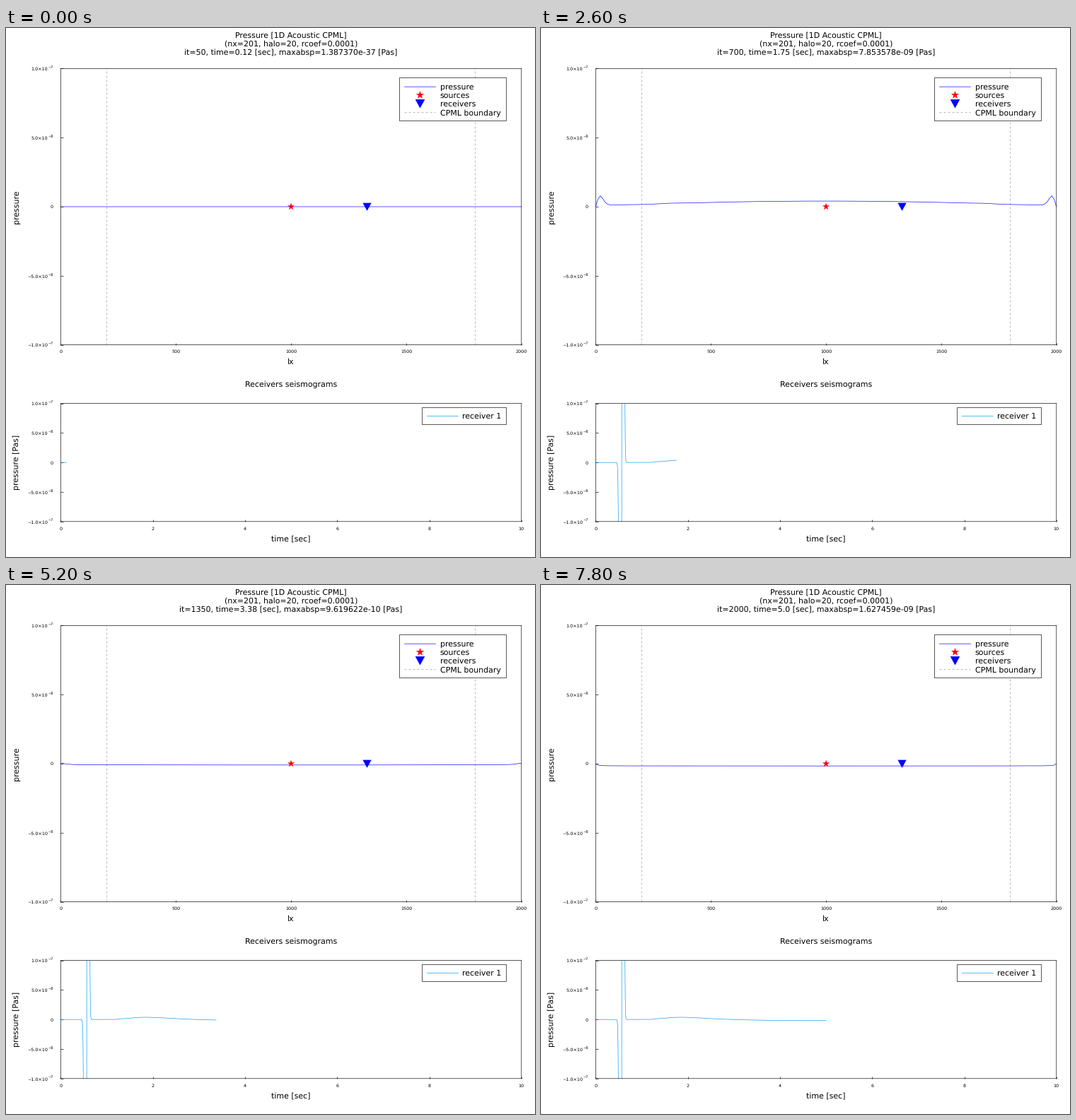
Write a matplotlib script that moves like this. It is 748 by 749 pixels and loops after 8000 ms.

```python
import numpy as np
import matplotlib.pyplot as plt
from matplotlib.animation import FuncAnimation
from matplotlib.patches import Polygon, Rectangle

W, H, DPI = 748, 749, 64
PT = 72 / DPI                     # points per pixel

# Model: 1D acoustic medium with CPML layers at both ends
NX, HALO, RCOEF = 201, 20, 0.0001
DX, DT, VEL = 10.0, 0.0025, 2000.0
FREQ, T0 = 10.0, 0.4
SRC, REC = 100, 133
FRAMES, STEPS = 40, 50
NT = FRAMES * STEPS


def ricker(t):
    b = (np.pi * FREQ * (t - T0)) ** 2
    return (1 - 2 * b) * np.exp(-b)


def cpml(pos):
    """Recursive convolution coefficients at the given node positions."""
    depth = np.maximum(HALO - pos, pos - (NX - 1 - HALO)).clip(0) / HALO
    d = -3 * VEL * np.log(RCOEF) / (2 * HALO * DX) * depth ** 2
    alpha = np.pi * FREQ * (1 - depth)
    b = np.exp(-(d + alpha) * DT)
    return d * (b - 1) / (d + alpha), b


def simulate():
    a, b = cpml(np.arange(1, NX - 1))
    a_half, b_half = cpml(np.arange(NX - 1) + 0.5)
    psi, xi = np.zeros(NX - 1), np.zeros(NX - 2)
    p = np.zeros((NT + 1, NX))
    for n in range(NT):
        cur, old = p[n], p[max(n - 1, 0)]
        grad = np.diff(cur) / DX
        psi = b_half * psi + a_half * grad
        lap, dpsi = np.diff(grad) / DX, np.diff(psi) / DX
        xi = b * xi + a * (lap + dpsi)
        p[n + 1, 1:-1] = (2 * cur - old)[1:-1] + (VEL * DT) ** 2 * (lap + dpsi + xi)
        p[n + 1, SRC] += DT ** 2 / DX * ricker(n * DT)
    return p


field = simulate()
x = np.arange(NX) * DX
times = np.arange(NT + 1) * DT

plt.rcParams.update({"font.family": "DejaVu Sans", "text.hinting": "none",
                     "lines.scale_dashes": False})
fig = plt.figure(figsize=(W / DPI, H / DPI), dpi=DPI, facecolor="white")

LEFT, RIGHT = 77.3, 728.8
MID = (LEFT + RIGHT) / 2
THIN = 0.65 * PT
SKY = "#009af9"
CURVE = dict(lw=THIN, snap=False)
DASH = dict(color="gray", lw=0.55 * PT, ls=(0, (3 * PT, 3 * PT)),
            dash_capstyle="butt", snap=False)


def panel(top, bottom, xmax, xticks):
    ax = fig.add_axes([LEFT / W, 1 - bottom / H, (RIGHT - LEFT) / W, (bottom - top) / H])
    ax.set(xlim=(0, xmax), ylim=(-1e-7, 1e-7), xticks=xticks,
           yticks=np.linspace(-1e-7, 1e-7, 5))
    ax.tick_params(direction="in", length=3.5 * PT, width=THIN,
                   labelbottom=False, labelleft=False)
    for s in ax.spines.values():
        s.set(linewidth=THIN, snap=False)
    for tick in [*ax.get_xticklines(), *ax.get_yticklines()]:
        tick.set_snap(False)
    return ax


wave_ax = panel(57.5, 448.5, 2000, range(0, 2001, 500))
trace_ax = panel(531.5, 698.8, 10, range(0, 11, 2))

# Overlay in pixel coordinates, origin at the top left
page = fig.add_axes([0, 0, 1, 1], zorder=5)
page.set(xlim=(0, W), ylim=(H, 0))
page.axis("off")


def label(px, py, s, size=11.0, ha="center", **kw):
    return page.text(px, py, s, fontsize=size * PT, ha=ha, va="baseline",
                     color="black", **kw)


def star(cx, cy, r):
    ang = np.arange(10) * np.pi / 5
    rad = np.where(np.arange(10) % 2, 0.382 * r, r)
    pts = np.c_[cx + rad * np.sin(ang), cy - rad * np.cos(ang)]
    page.add_patch(Polygon(pts, fc="red", ec="none", zorder=3))


def triangle(cx, cy, r):
    pts = [(cx - r, cy - 0.84 * r), (cx + r, cy - 0.84 * r), (cx, cy + r)]
    page.add_patch(Polygon(pts, fc="blue", ec="none", zorder=3))


def box(x0, y0, x1, y1):
    page.add_patch(Rectangle((x0, y0), x1 - x0, y1 - y0, fc="white", ec="black",
                             lw=THIN, snap=False, zorder=1))


def axis_labels(top, bottom, xmax, count, name_x, name_y):
    for i in range(count):
        f = i / (count - 1)
        label(LEFT + f * (RIGHT - LEFT), bottom + 11.8, f"{xmax * f:.0f}", 6.35)
    for i, (base, power) in enumerate([("1.0", 7), ("5.0", 8), ("0", 0),
                                       ("\u22125.0", 8), ("\u22121.0", 7)]):
        y = top + i * (bottom - top) / 4
        if power:
            label(59.3, y + 2.9, base + "\u00d710", 6.35, ha="right")
            label(59.3, y - 0.3, f"\u2212{power}", 5.0, ha="left")
        else:
            label(66.6, y + 2.4, base, 6.35, ha="right")
    label(MID, bottom + 28, name_x)
    label(18, (top + bottom) / 2, name_y, rotation=90, rotation_mode="anchor")


axis_labels(57.5, 448.5, 2000, 5, "lx", "pressure")
axis_labels(531.5, 698.8, 10, 6, "time [sec]", "pressure [Pas]")

label(MID, 13.5, "Pressure [1D Acoustic CPML]")
label(MID, 25.7, f"(nx={NX}, halo={HALO}, rcoef={RCOEF})")
status = label(MID, 37.9, "")
label(MID, 508, "Receivers seismograms")

# Curves and markers
for edge in (HALO * DX, (NX - 1 - HALO) * DX):
    wave_ax.plot([edge, edge], [-1e-7, 1e-7], **DASH)
wave, = wave_ax.plot([], [], color="blue", **CURVE)
trace, = trace_ax.plot([], [], color=SKY, **CURVE)
star(MID, 253, 5.4)
triangle(LEFT + REC * DX / 2000 * (RIGHT - LEFT), 252.8, 6.1)

# Legends
box(556.5, 70.5, 707.5, 131.5)
page.plot([563.5, 607.5], [83.2, 83.2], color="blue", **CURVE)
star(585.5, 95, 6)
triangle(585.5, 106.8, 6.8)
page.plot([563.5, 607.5], [119.3, 119.3], **DASH)
for i, name in enumerate(["pressure", "sources", "receivers", "CPML boundary"]):
    label(613.7, 87 + 12.1 * i, name, ha="left")
box(588.5, 537.5, 707.5, 561.5)
page.plot([595.5, 639.5], [549.4, 549.4], color=SKY, **CURVE)
label(645.5, 553.3, "receiver 1", ha="left")


def update(k):
    it = (k + 1) * STEPS
    p = field[it]
    wave.set_data(x, p)
    trace.set_data(times[:it + 1], field[:it + 1, REC])
    status.set_text(f"it={it}, time={round(it / 400, 2)} [sec], "
                    f"maxabsp={np.abs(p).max():.6e} [Pas]")
    return wave, trace, status


anim = FuncAnimation(fig, update, frames=FRAMES, interval=200, repeat=True,
                     repeat_delay=0, init_func=lambda: update(0))
plt.show()
```
